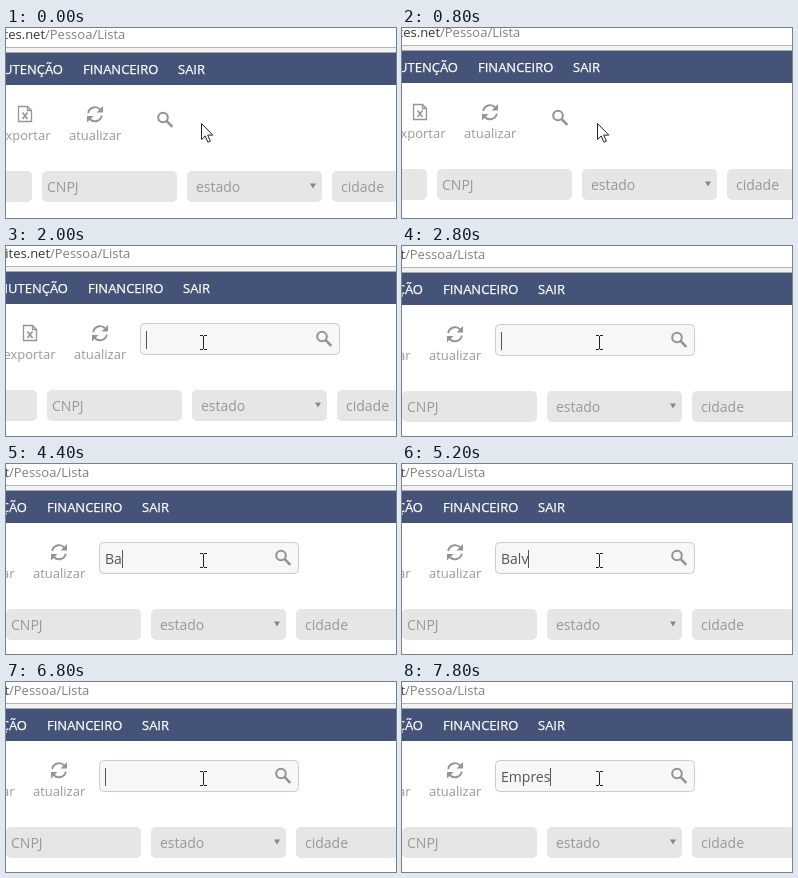
Animation of 390x190 px, one loop 8 s. Source, as an HTML page:

```html
<!DOCTYPE html>
<html lang="pt">
<head>
<meta charset="utf-8">
<title>Pesquisa rápida</title>
<style>
  html, body { margin: 0; width: 100%; height: 100%; overflow: hidden; background: #fff; }
  svg { display: block; width: 390px; height: 190px; }
  text { font: 13px "Open Sans", "Noto Sans", sans-serif; white-space: pre; }
  .menu { fill: #fff; stroke: #fff; stroke-width: .25px; }
  .tool { fill: #999; }
  .field text { font-size: 14px; fill: #999; }
  .field rect { fill: #e6e6e6; }
  #query { font-size: 14px; fill: #555; }
  .end { text-anchor: end; }
</style>
</head>
<body>
<svg viewBox="0 0 390 190">
  <g id="page">
    <!-- browser bar -->
    <text class="end" x="3" y="13" fill="#333">painelsites.net</text>
    <text x="3" y="13" fill="#808080">/Pessoa/Lista</text>
    <rect x="-150" y="21" width="700" height="6" fill="#f2f2f2"/>
    <rect x="-150" y="21" width="700" height="1" fill="#b4b4b4"/>
    <rect x="-150" y="26" width="700" height="1" fill="#a8a8ac"/>

    <!-- menu -->
    <rect x="-150" y="27" width="700" height="32" fill="#445377"/>
    <text class="menu end" x="21" y="48">MANUTENÇÃO</text>
    <text class="menu" x="41" y="48">FINANCEIRO</text>
    <text class="menu" x="136" y="48">SAIR</text>

    <!-- toolbar -->
    <g fill="none" stroke="#949494" stroke-width="1.3">
      <path d="M-23.5 80.5h9l4 4v11h-13zM-14.5 80.5v4h4"/>
      <path d="M-19.5 86.5l5 6.500M-14.500 86.500l-5 6.500" stroke-width="1.600"/>
      <path d="M46.200 87a7 7 0 0 1 12-3.600M59.800 89.600a7 7 0 0 1-12 3.400" stroke-width="1.900"/>
    </g>
    <path d="M61 80v6.500h-6.500zM45 96.500v-6.500h6.500z" fill="#949494"/>
    <text class="tool end" x="8.500" y="114">exportar</text>
    <text class="tool" x="27" y="114">atualizar</text>

    <!-- search -->
    <rect id="box" x="93.5" y="78.5" height="31" rx="4" fill="#f8f6f8" stroke="#ccc"/>
    <g id="lens" fill="none" stroke="#939393">
      <circle cx="-2" cy="-2" r="4.800" stroke-width="2"/>
      <path d="M1.700 1.700L7.300 7.300" stroke-width="2.600"/>
    </g>
    <text id="query" x="99" y="100"></text>
    <rect id="caret" y="86" width="1" height="18" fill="#555"/>

    <!-- filters -->
    <g class="field" id="fields"></g>
    <path d="M268 157.500h6l-3 5z" fill="#888"/>
  </g>

  <path id="arrow" d="M195.500 95.500v16l3.700-3.500 2.700 6.200 2.500-1.100-2.700-6h5.100z" fill="#fff" stroke="#222"/>
  <path id="beam" d="M194 89.500h3M198 89.500h3M197.500 90v13M194 103.500h3M198 103.500h3" fill="none" stroke="#222"/>
</svg>
<script>
const LOOP = 8000, STEP = 200, CLICK = 1400;
const $ = id => document.getElementById(id);

// The view follows the pointer: time, x, y
const pan = [
  [0, 36, -2], [800, 35, -4], [1000, 44, -3], [1200, 58, -2], [1400, 66, -1],
  [1600, 66, -1], [2000, 41, -1], [2400, 22, 0], [2800, 0, 0]
];

// Edits of the query: time, word, letters shown
const NAME = "Balvio", WORD = "Empresa";
const edits = [
  [1600, "", 0], [4200, NAME, 1], [4400, NAME, 2], [4800, NAME, 3], [5200, NAME, 4],
  [5400, NAME, 5], [5800, NAME, 6], [6400, NAME, 4], [6600, NAME, 1], [6800, "", 0],
  [7000, WORD, 1], [7200, WORD, 2], [7400, WORD, 3], [7600, WORD, 4], [7800, WORD, 6]
];

$("fields").innerHTML = ["", "CNPJ", "estado", "cidade"].map((label, i) => {
  const x = 145 * (i - 1);
  return `<rect x="${x}" y="145" width="135" height="31" rx="5"/>
    <text x="${x + (i > 1 ? 9 : 5)}" y="166">${label}</text>`;
}).join("");

const show = (id, on) => $(id).setAttribute("visibility", on ? "visible" : "hidden");

function panAt(t) {
  const i = pan.findIndex(p => p[0] > t);
  if (i < 0) return [0, 0];
  const a = pan[i - 1], b = pan[i], k = (t - a[0]) / (b[0] - a[0]);
  return [1, 2].map(n => Math.round(a[n] + (b[n] - a[n]) * k));
}

function draw(t) {
  $("page").setAttribute("transform", `translate(${panAt(t)})`);

  const open = Math.min(1, Math.max(0, (t - CLICK) / 400));
  const width = 45 + 154 * open;
  $("box").setAttribute("width", width);
  show("box", open > 0);
  $("lens").setAttribute("transform", `translate(${93.5 + width - 15.5} 93.5)`);

  const edit = edits.filter(e => e[0] <= t).pop();
  const query = $("query");
  query.textContent = edit ? edit[1].slice(0, edit[2]) : "";
  const end = query.textContent ? query.getComputedTextLength() : 0;
  $("caret").setAttribute("x", Math.round(99 + end));
  show("caret", edit && (t - edit[0]) % 1060 < 530);

  show("arrow", t <= CLICK);
  show("beam", t > CLICK);
}

const start = performance.now();
function tick() {
  const t = (performance.now() - start) % LOOP;
  draw(Math.floor(t / STEP) * STEP);
  requestAnimationFrame(tick);
}
tick();
</script>
</body>
</html>
```
